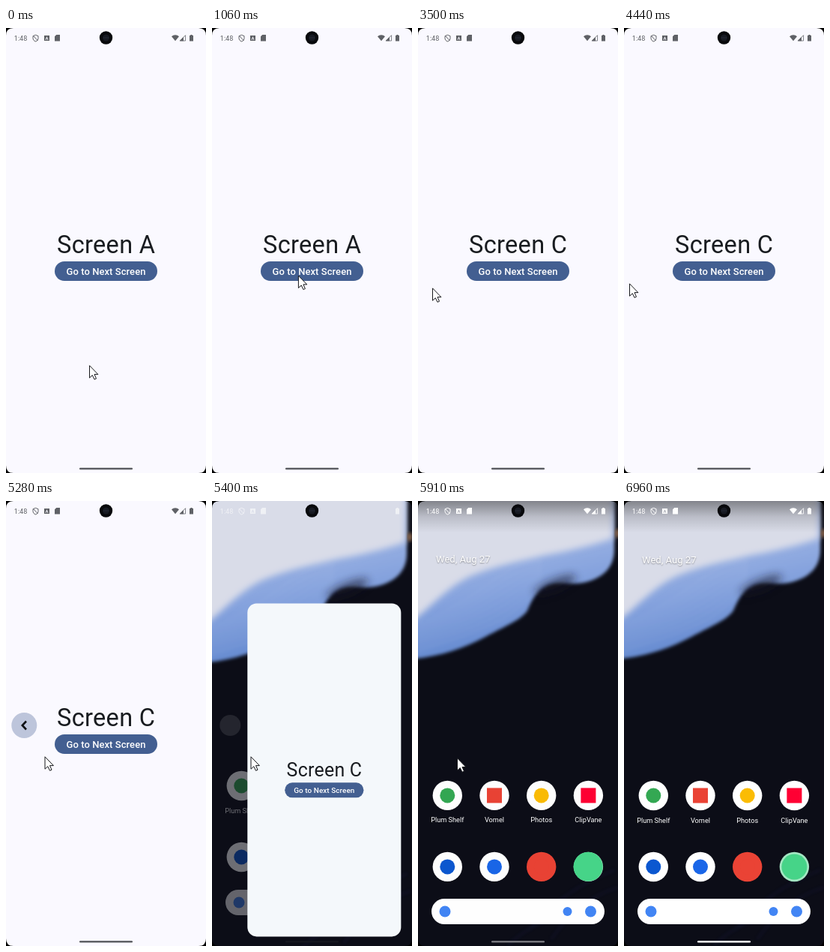
Recreate the animation shown at these times as an HTML page. Size 267x593 px, loop 7.7 s.

```html
<!DOCTYPE html>
<html lang="en">
<head>
<meta charset="utf-8">
<title>Screen navigation</title>
<style>
html, body { margin: 0; width: 100%; height: 100%; overflow: hidden; background: #000; }
svg { display: block; width: 100vw; height: 100vh; font-family: Roboto, sans-serif; }
</style>
</head>
<body>
<svg viewBox="0 0 267 593">
  <defs>
    <filter id="soft"><feGaussianBlur stdDeviation="2"/></filter>
    <filter id="haze"><feGaussianBlur stdDeviation="4"/></filter>
    <filter id="smoke" x="-50%" y="-100%" width="200%" height="300%"><feGaussianBlur stdDeviation="6"/></filter>
    <linearGradient id="blue" x2=".25" y2="1">
      <stop offset=".2" stop-color="#b0c1e8"/><stop offset=".65" stop-color="#86a3de"/><stop offset="1" stop-color="#6288cf"/>
    </linearGradient>
    <linearGradient id="shade" x2="0" y2="1">
      <stop stop-opacity=".4"/><stop offset=".5" stop-opacity=".14"/><stop offset="1" stop-opacity="0"/>
    </linearGradient>
    <clipPath id="pillClip"><rect x="65" y="311" width="137" height="26" rx="13"/></clipPath>
  </defs>

  <g id="home">
    <rect width="267" height="593" fill="#0c0d17"/>
    <g id="wall">
      <path d="M148 572Q190 520 262 492M178 584Q215 530 267 515M120 592Q150 565 172 560" fill="none" stroke="#1b2350" stroke-width="2" opacity=".35" filter="url(#soft)"/>
      <g filter="url(#soft)">
        <path fill="url(#blue)" d="M-10 211C30 207 60 197 90 181C120 165 138 158 146 146C152 132 158 119 174 112C190 106 203 112 220 109C245 104 262 90 262 65V-10H-10Z"/>
        <g id="streaks" fill="none" stroke="#fff" stroke-opacity=".13"/>
      </g>
      <ellipse cx="183" cy="112" rx="30" ry="8" transform="rotate(-22 183 112)" fill="#141826" opacity=".6" filter="url(#smoke)"/>
      <path filter="url(#haze)" fill="#d9dce8" d="M-20 170C18 142 40 112 75 98C110 84 140 80 170 72C205 66 235 58 260 50V-20H-20Z"/>
      <path d="M265 -20V100" stroke="#0c0d17" stroke-width="5" filter="url(#soft)"/>
      <ellipse cx="266" cy="43" rx="3" ry="6" fill="#8a6548" filter="url(#soft)"/>
    </g>
    <rect id="scrim" width="267" height="42" fill="url(#shade)"/>
    <text id="date" x="24" y="82.5" font-size="13.1" fill="#fff" style="text-shadow:0 1px 2px #0006">Wed, Aug 27</text>
    <g id="icons"></g>
    <g id="search" fill="#4285f4">
      <rect x="18" y="530" width="231" height="34" rx="17" fill="#fff"/>
      <circle cx="36" cy="547" r="7.5"/>
      <circle cx="199.5" cy="547" r="6"/>
      <circle cx="230.5" cy="547" r="7.5"/>
    </g>
    <circle id="landing" r="19.5" fill="#46d488"/>
  </g>

  <g id="app">
    <rect id="page" width="267"/>
    <text id="title" x="133.7" y="300" font-size="32.5" letter-spacing=".325" text-anchor="middle" fill="#191c20"></text>
    <rect x="65" y="311" width="137" height="26" rx="13" fill="#435f91"/>
    <circle id="ripple" cx="130.5" cy="326" r="16" fill="#fff" opacity=".1" clip-path="url(#pillClip)"/>
    <text x="133.5" y="328.5" font-size="13" font-weight="500" letter-spacing=".065" text-anchor="middle" fill="#fff">Go to Next Screen</text>
  </g>

  <circle id="disc" cx="24.3" cy="299"/>
  <path id="chevron" d="M27 293.5L21.8 299L27 304.5" fill="none" stroke="#101216" stroke-width="2.6"/>

  <g id="status">
    <text x="10.8" y="17" font-size="9.1">1:48</text>
    <path d="M39.5 9.3l3.5 1.4v3c0 2-1.5 3.6-3.5 4.3-2-.7-3.5-2.3-3.5-4.3v-3zM36.5 10.5l6 6.5" fill="none" stroke="currentColor"/>
    <path fill-rule="evenodd" d="M51 10h7v7h-7zM54.5 11.2l2 4.6h-1.1l-.9-2.4-.9 2.4h-1.1z"/>
    <path d="M67.3 9h4.7v8.5h-7v-6.2z"/>
    <g id="radio">
      <path d="M221 11.2a7.4 7.4 0 0 1 10 0l-5 6zM237 12v5.3h-5.3z"/>
      <path d="M239.6 9.7v7.3h-7.3z" fill="none" stroke="currentColor" stroke-width=".8"/>
    </g>
    <path d="M245 10h1.3v-1h2.4v1h1.3v7.5h-5z"/>
  </g>
  <rect id="pill" x="98" y="586" width="71" height="2.6" rx="1.3"/>
  <circle cx="133.5" cy="13" r="8.7" fill="#08090c"/>
  <circle cx="133.5" cy="13" r="4.5" fill="#171a22"/>
  <path d="M130.5 13h6" stroke="#3c4150" stroke-dasharray="1 1.5"/>
  <path id="cursor" d="M.5 .8V17.2L4.3 13.7L7 19.3L9.5 18.2L7 12.6H11.9Z" fill="#fff" stroke="#16171b" stroke-linejoin="round"/>
  <path fill-rule="evenodd" d="M0 0H267V593H0ZM10 0H257Q267 0 267 10V583Q267 593 257 593H10Q0 593 0 583V10Q0 0 10 0Z"/>
</svg>
<script>
const LOOP = 7700, STEP = 120;
const TAP_A = 1420, PRESS = 2440, TAP_B = 2590, DRAG = 4590, CARD = 5400, HOME = 5550, LEAVE = 6300;

const $ = id => document.getElementById(id);
const set = (id, attrs) => { for (const k in attrs) $(id).setAttribute(k, attrs[k]); };
const show = (id, on) => set(id, { visibility: on ? 'visible' : 'hidden' });

// Eased progress of a move that starts at a given time and takes n steps
function progress(t, start, n) {
  const k = Math.min(n, Math.max(0, Math.floor((t - start) / STEP) + 1));
  return 1 - (1 - k / n) ** 2;
}

// Pointer moves: start, steps, x, y, downward bow
const moves = [
  [430, 2, 113, 430.5], [700, 5, 115, 325], [1690, 6, 125, 327, 24], [2890, 6, 19, 346, 13],
  [3650, 2, 13, 342], [4040, 3, 7, 340], [DRAG, 3, 51.5, 340], [HOME, 5, 52, 342],
  [LEAVE, 2, 81, 429], [6570, 3, 226, 583], [6960, 1, 240, 620]
];
function pointer(t) {
  let x = 111, y = 449;
  for (const [start, n, toX, toY, bow = 0] of moves) {
    const p = progress(t, start, n);
    x += (toX - x) * p;
    y += (toY - y) * p + bow * Math.sin(Math.PI * p);
  }
  return `translate(${x} ${y})`;
}

const circle = (x, y, r, fill) => `<circle cx="${x}" cy="${y}" r="${r}" fill="${fill}"/>`;
const square = (x, y, r, fill) => `<rect x="${x - r}" y="${y - r}" width="${2 * r}" height="${2 * r}" fill="${fill}"/>`;
const apps = [
  { name: 'Plum Shelf', mark: circle, fill: '#34a853' },
  { name: 'Vomel', mark: square, fill: '#ea4335' },
  { name: 'Photos', mark: circle, fill: '#fbbc04' },
  { name: 'ClipVane', mark: square, fill: '#ff0033' },
  { mark: circle, fill: '#0b57d0' },
  { mark: circle, fill: '#1a66e8' },
  { mark: circle, fill: '#ea4335', base: '#ea4335' },
  { mark: circle, fill: '#46d488', base: '#a3e6c2', r: 17 }
];
$('icons').innerHTML = apps.map(({ name = '', mark, fill, base = '#fff', r = 10 }, i) => {
  const x = 39.3 + i % 4 * 62.7, y = i < 4 ? 392.5 : 487.5;
  return circle(x, y, 19.7, base) + mark(x, y, r, fill) +
    `<text x="${x}" y="${y + 36}" font-size="9.2" text-anchor="middle" fill="#fff">${name}</text>`;
}).join('');

$('streaks').innerHTML = Array.from({ length: 8 }, (_, i) =>
  `<path d="M0 ${165 + i * 5}Q55 ${140 + i * 6} 95 ${110 + i * 8}T165 ${80 + i * 4}"/>`).join('');

function draw(t) {
  const card = t >= CARD && t < HOME, home = t >= HOME;
  set('cursor', { transform: pointer(t) });

  show('home', card || home);
  show('app', !home);
  $('title').textContent = 'Screen ' + (t < TAP_A ? 'A' : t < TAP_B ? 'B' : 'C');
  show('ripple', t >= PRESS && t < TAP_B);
  set('app', { transform: card ? 'translate(47.3 136.5) scale(.768)' : '' });
  set('page', { height: card ? 578 : 593, rx: card ? 16 : 0, fill: card ? '#f4f8fb' : '#faf9ff' });

  show('disc', !home);
  set('disc', { r: card ? 14 : 17 * progress(t, DRAG, 4), fill: card ? '#24252e' : '#bdc5db' });
  show('chevron', t >= DRAG + 2 * STEP && t < CARD);

  // The launcher settles into place
  const left = 1 - progress(t, HOME + STEP, 4);
  set('wall', { transform: card ? 'translate(-2 5)' : '' });
  show('scrim', home);
  show('date', home);
  set('date', { transform: `translate(0 ${-3 * left})`, opacity: 1 - .25 * left });
  set('icons', { transform: `translate(0 ${card ? -13 : -1.5 * left})`, opacity: card ? .4 : 1 - .1 * left });
  set('search', { transform: `translate(0 ${card ? -12 : -left})`, opacity: card ? .36 : 1 - .05 * left });
  show('landing', home && left > 0);
  set('landing', { cx: 227.5 - 7 * left, cy: 487.5 - 2.5 * left });

  const ink = card || home ? '#fff' : '#5f6166';
  set('status', { fill: ink, color: ink, opacity: card ? .6 : 1 });
  show('radio', !card);
  set('pill', { fill: card ? '#15161e' : !home ? ink : t < LEAVE ? '#77777d' : '#fff' });
}

function tick() {
  draw(performance.now() % LOOP);
  requestAnimationFrame(tick);
}
tick();
</script>
</body>
</html>
```
